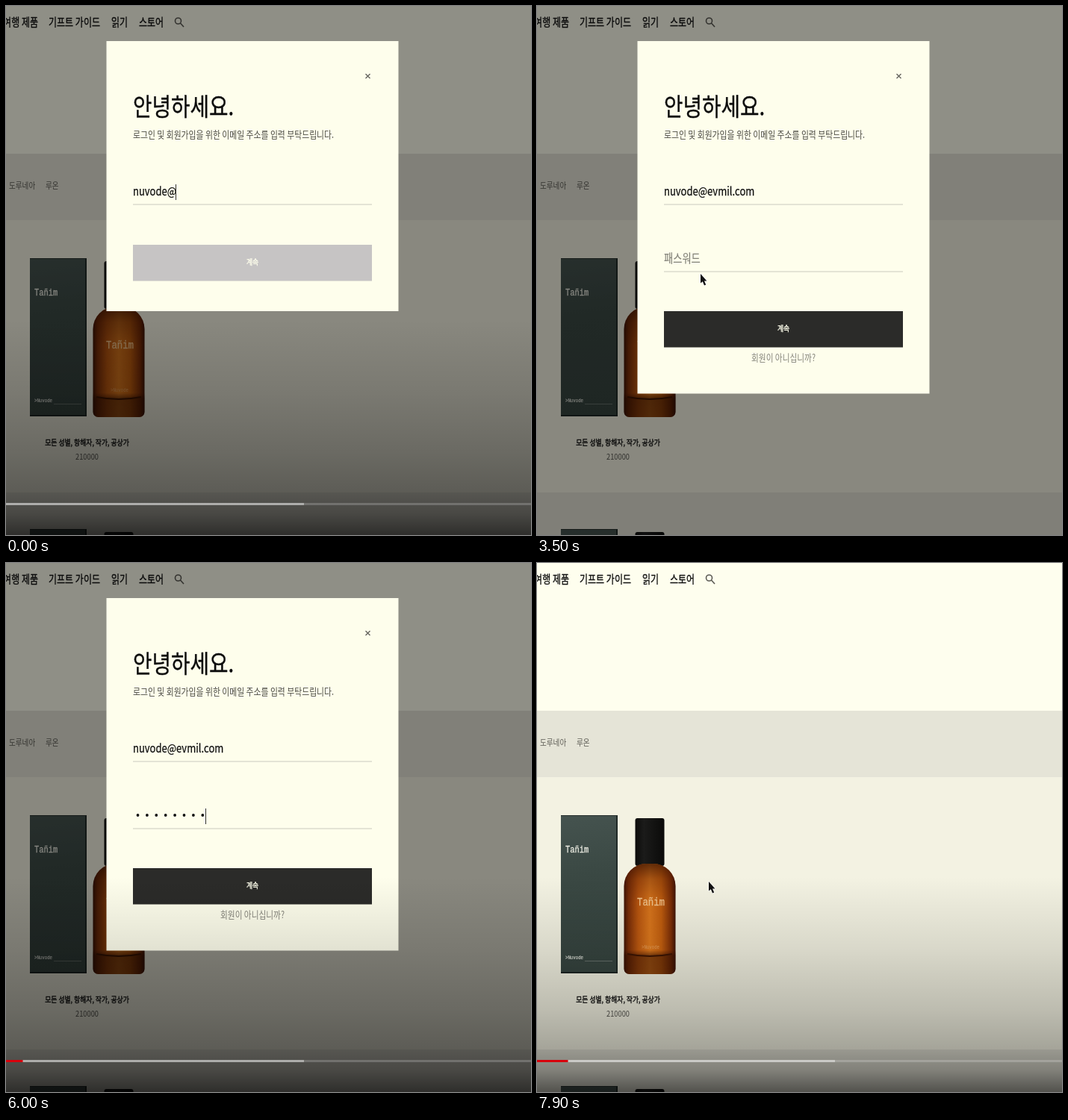
Recreate the animation shown at these times as an HTML page with a canvas. Size 703x709 px, loop 8000 ms.

```html
<!DOCTYPE html>
<html lang="ko">
<head>
<meta charset="utf-8">
<title>로그인</title>
<style>
  html, body { margin: 0; width: 100%; height: 100%; overflow: hidden; background: #fefeee; }
  canvas { display: block; }
</style>
</head>
<body>
<canvas id="stage" width="703" height="709"></canvas>
<script>
const ctx = document.getElementById('stage').getContext('2d');
const W = 703, H = 709, LOOP = 8000, STEP = 100;
const SANS = '"Noto Sans CJK KR", "Noto Sans CJK", "Noto Sans", sans-serif';
const MONO = '"Liberation Mono", "Noto Sans Mono", monospace';
const CONDENSED = 0.84; // the whole page uses one narrow face
const CREAM = '#fefeec';

const EMAIL = 'nuvode@evmil.com', TYPED_AT_START = 7;
const emailKeys = [800, 1000, 1100, 1300, 1500, 1700, 1800, 1900, 2100];
const dotKeys = Array.from({ length: 8 }, (_, i) => 4500 + i * 200);
const PASSWORD_STEP = 3500, PASSWORD_FOCUS = 4000, SUBMIT = 7600, CLOSE = 7900;

// Each stroke of the pointer: [time, x, y]; it is hidden between strokes.
const pointerStrokes = [
  [[2300, 260, 265], [2500, 260, 265], [3000, 219, 359], [3700, 219, 359], [3950, 212, 338], [4499, 212, 338]],
  [[7200, 224, 342], [7300, 224, 342], [7600, 230, 427], [7999, 230, 427]]
];

const clamp = v => Math.max(0, Math.min(1, v));
const ease = p => p * p * (3 - 2 * p);
const pressed = (keys, t) => keys.filter(k => k <= t).length;

function rect(x, y, w, h, color) {
  ctx.fillStyle = color;
  ctx.fillRect(x, y, w, h);
}

function gradient(x0, y0, x1, y1, stops) {
  const g = ctx.createLinearGradient(x0, y0, x1, y1);
  stops.forEach(([at, color]) => g.addColorStop(at, color));
  return g;
}

// `heavy` is an outline width that thickens the regular weight.
function text(str, x, baseline, size, color, { align = 'left', heavy = 0, family = SANS } = {}) {
  ctx.save();
  ctx.translate(x, baseline);
  ctx.scale(CONDENSED, 1);
  ctx.font = `${size}px ${family}`;
  ctx.textAlign = align;
  ctx.fillStyle = ctx.strokeStyle = color;
  ctx.fillText(str, 0, 0);
  if (heavy) {
    ctx.lineWidth = heavy;
    ctx.lineJoin = 'round';
    ctx.strokeText(str, 0, 0);
  }
  const width = ctx.measureText(str).width * CONDENSED;
  ctx.restore();
  return width;
}

function roundRect(x, y, w, h, radii, fill) {
  ctx.beginPath();
  ctx.roundRect(x, y, w, h, radii);
  ctx.fillStyle = fill;
  ctx.fill();
}

function drawBottle() {
  roundRect(131.5, 4, 39, 64, 3, gradient(131, 0, 171, 0, [[0, '#0b0b0a'], [0.3, '#1b1b1a'], [1, '#0a0a09']]));

  const body = [116.5, 65, 69, 148, [30, 30, 7, 7]];
  roundRect(...body, gradient(116, 0, 186, 0, [
    [0, '#3a1204'], [0.09, '#7c2f08'], [0.28, '#c05a10'], [0.5, '#e27c1e'],
    [0.72, '#c8620f'], [0.91, '#7e2f07'], [1, '#3a1204']]));
  roundRect(...body, gradient(0, 65, 0, 213, [
    [0, 'rgba(45,12,0,.7)'], [0.14, 'rgba(60,15,0,.35)'], [0.35, 'rgba(60,15,0,.08)'],
    [0.78, 'rgba(60,15,0,0)'], [0.83, 'rgba(45,12,0,.5)'], [1, 'rgba(45,12,0,.45)']]));

  ctx.strokeStyle = '#3c1402';
  ctx.lineWidth = 2;
  ctx.beginPath();
  ctx.moveTo(121, 186);
  ctx.quadraticCurveTo(151, 192, 181, 186);
  ctx.stroke();
  text('Tañim', 134, 121, 14.7, '#f0c48e', { family: MONO, heavy: 0.3 });
  text('>Nuvode', 140, 178.5, 6.8, '#eaa25c', { family: MONO });
}

function drawProduct(top) {
  ctx.save();
  ctx.translate(0, top);
  rect(32, 0, 76, 212, gradient(32, 0, 60, 212, [[0, '#45534f'], [0.4, '#3a4843'], [1, '#36443f']]));
  rect(106, 0, 2, 212, '#202a27');
  rect(32, 0, 76, 1, '#27302d');
  rect(32, 210, 76, 2, '#1d2523');
  rect(64, 195, 37, 1, '#66706b');
  text('Tañim', 38, 50, 12.4, '#f0f0e6', { family: MONO, heavy: 0.3 });
  text('>Nuvode', 38, 192.5, 6.8, '#e4e6de', { family: MONO, heavy: 0.2 });
  drawBottle();
  ctx.restore();
}

function drawPage() {
  rect(0, 0, W, H, '#fefeee');
  rect(0, 198, W, 89, '#e5e4d7');
  rect(0, 287, W, 365, '#f3f2e2');
  rect(0, 652, W, 57, '#e3e2d5');

  const nav = { heavy: 0.35 };
  text('여행 제품', 43, 27, 14.3, '#111', { ...nav, align: 'right' });
  text('기프트 가이드', 57, 27, 14.3, '#111', nav);
  text('읽기', 141, 27, 14.3, '#111', nav);
  text('스토어', 178, 27, 14.3, '#111', nav);
  ctx.strokeStyle = '#5c5b55';
  ctx.lineWidth = 1.6;
  ctx.beginPath();
  ctx.arc(230.5, 20, 4, 0, Math.PI * 2);
  ctx.moveTo(233.5, 23);
  ctx.lineTo(238, 28);
  ctx.stroke();

  text('도루네아', 4, 245.3, 11.4, '#5d5c55');
  text('루온', 53, 245.3, 11.4, '#5d5c55');

  drawProduct(338);
  drawProduct(701);
  text('모든 성별, 항해자, 작가, 공상가', 108.5, 588.8, 10.5, '#111', { align: 'center', heavy: 0.35 });
  text('210000', 108.5, 607.5, 11, '#55544e', { align: 'center' });
}

function drawCaret(x, y, t, lastKey) {
  const idle = Math.max(0, t - lastKey - STEP);
  if (idle % 1000 < 500) rect(Math.round(x) - 1, y, 1, 21, '#333');
}

function drawModal(t) {
  const hasPassword = t >= PASSWORD_STEP;
  const buttonY = hasPassword ? 409 : 320;
  rect(0, 0, W, H, 'rgba(0,0,0,.44)');
  rect(134.5, 47, 391, hasPassword ? 472.5 : 362, CREAM);

  ctx.strokeStyle = '#66655f';
  ctx.lineWidth = 1.4;
  ctx.beginPath();
  ctx.moveTo(481.5, 91); ctx.lineTo(487.5, 97);
  ctx.moveTo(487.5, 91); ctx.lineTo(481.5, 97);
  ctx.stroke();

  text('안녕하세요.', 170, 147, 33, '#0c0c0c', { heavy: 0.4 });
  text('로그인 및 회원가입을 위한 이메일 주소를 입력 부탁드립니다.', 170, 177, 12.9, '#4d4c46');

  const emailKeyCount = pressed(emailKeys, t);
  const email = EMAIL.slice(0, TYPED_AT_START + emailKeyCount);
  const emailWidth = text(email, 170, 253.5, 15.5, '#0c0c0c', { heavy: 0.25 });
  rect(170, 265.5, 320, 1, '#cccbbf');
  if (!hasPassword) drawCaret(170 + emailWidth, 239, t, emailKeyCount ? emailKeys[emailKeyCount - 1] : t);

  if (hasPassword) {
    const dots = pressed(dotKeys, t);
    if (!dots) text('패스워드', 170, 343.7, 15.8, '#85847b', { heavy: 0.2 });
    for (let i = 0; i < dots; i++) {
      ctx.fillStyle = '#111';
      ctx.beginPath();
      ctx.arc(176.5 + i * 12.4, 338, 1.9, 0, Math.PI * 2);
      ctx.fill();
    }
    rect(170, 355.5, 320, 1, '#cccbbf');
    if (t >= PASSWORD_FOCUS && t < SUBMIT) {
      drawCaret(170 + dots * 12.3, 329, t, dots ? dotKeys[dots - 1] : PASSWORD_FOCUS);
    }
    text('회원이 아니십니까?', 330, 475.8, 12.7, '#85847b', { align: 'center' });
  }

  const enabled = email.includes('.');
  rect(170, buttonY, 320, 48.5, enabled ? '#2b2b29' : '#c6c4c4');
  text('계속', 330, buttonY + 27.3, 10.5, CREAM, { align: 'center', heavy: 0.4 });
}

const shapes = {
  arrow: new Path2D('M0 0V12.5L2.8 10.2 5 15.4 7.2 14.4 5 9.5H8.4Z'),
  hand: new Path2D('M-1.5 1Q-.5-1 1 .8L2.6 5.5 8 6.8Q9.5 8 8.6 12L8 15H1.8L-3.2 9Q-3.5 7-.3 8.2Z'),
  beam: new Path2D('M-3-7.5Q0-7.5 0-5V5Q0 7.5-3 7.5M3-7.5Q0-7.5 0-5M3 7.5Q0 7.5 0 5M-2 2.5H2')
};

function pointerShape(y, t) {
  if (t >= CLOSE) return 'arrow';
  const shift = t >= PASSWORD_STEP ? 89.5 : 0;
  if (y >= 320 + shift && y <= 368 + shift) return 'hand';
  if (y >= 232 + shift && y <= 267 + shift) return 'beam';
  return 'arrow';
}

function drawPointer(t) {
  const stroke = pointerStrokes.find(s => t >= s[0][0] && t <= s[s.length - 1][0]);
  if (!stroke) return;
  const next = stroke.findIndex((point, i) => i && t <= point[0]);
  const [t0, x0, y0] = stroke[next - 1], [t1, x1, y1] = stroke[next];
  const p = ease((t - t0) / (t1 - t0));
  const x = x0 + (x1 - x0) * p, y = y0 + (y1 - y0) * p;
  const kind = pointerShape(y, t), shape = shapes[kind];

  ctx.save();
  ctx.translate(x, y);
  ctx.lineJoin = 'round';
  ctx.lineWidth = kind === 'beam' ? 1.3 : 1.6;
  ctx.strokeStyle = kind === 'arrow' ? 'rgba(255,255,255,.8)' : '#111';
  ctx.stroke(shape);
  if (kind !== 'beam') {
    ctx.fillStyle = kind === 'arrow' ? '#111' : '#fff';
    ctx.fill(shape);
  }
  ctx.restore();
}

function drawPlayer(t) {
  const fadeOut = 1 - clamp((t - 600) / 300);
  ctx.globalAlpha = Math.max(fadeOut, clamp((t - 4400) / 200));
  rect(0, 420, W, H - 420, gradient(0, 420, 0, H, [
    [0, 'rgba(0,0,0,0)'], [0.34, 'rgba(0,0,0,.11)'], [0.62, 'rgba(0,0,0,.225)'],
    [0.8, 'rgba(0,0,0,.32)'], [0.9, 'rgba(0,0,0,.43)'], [1, 'rgba(0,0,0,.64)']]));

  ctx.globalAlpha = Math.max(fadeOut, clamp((t - 4600) / 200));
  rect(0, 666, W, 3, 'rgba(255,255,255,.2)');
  rect(0, 666, 399, 3, 'rgba(255,255,255,.42)');
  rect(0, 666, Math.max(0, 22.5 + (t - 6000) * 0.01), 3, '#d8000c');
  ctx.globalAlpha = 1;
}

const start = performance.now();

function frame() {
  const elapsed = (performance.now() - start) % LOOP;
  const t = Math.floor(elapsed / STEP) * STEP;
  drawPage();
  if (t < CLOSE) drawModal(t);
  drawPointer(t);
  drawPlayer(t);
  requestAnimationFrame(frame);
}
frame();
</script>
</body>
</html>
```
